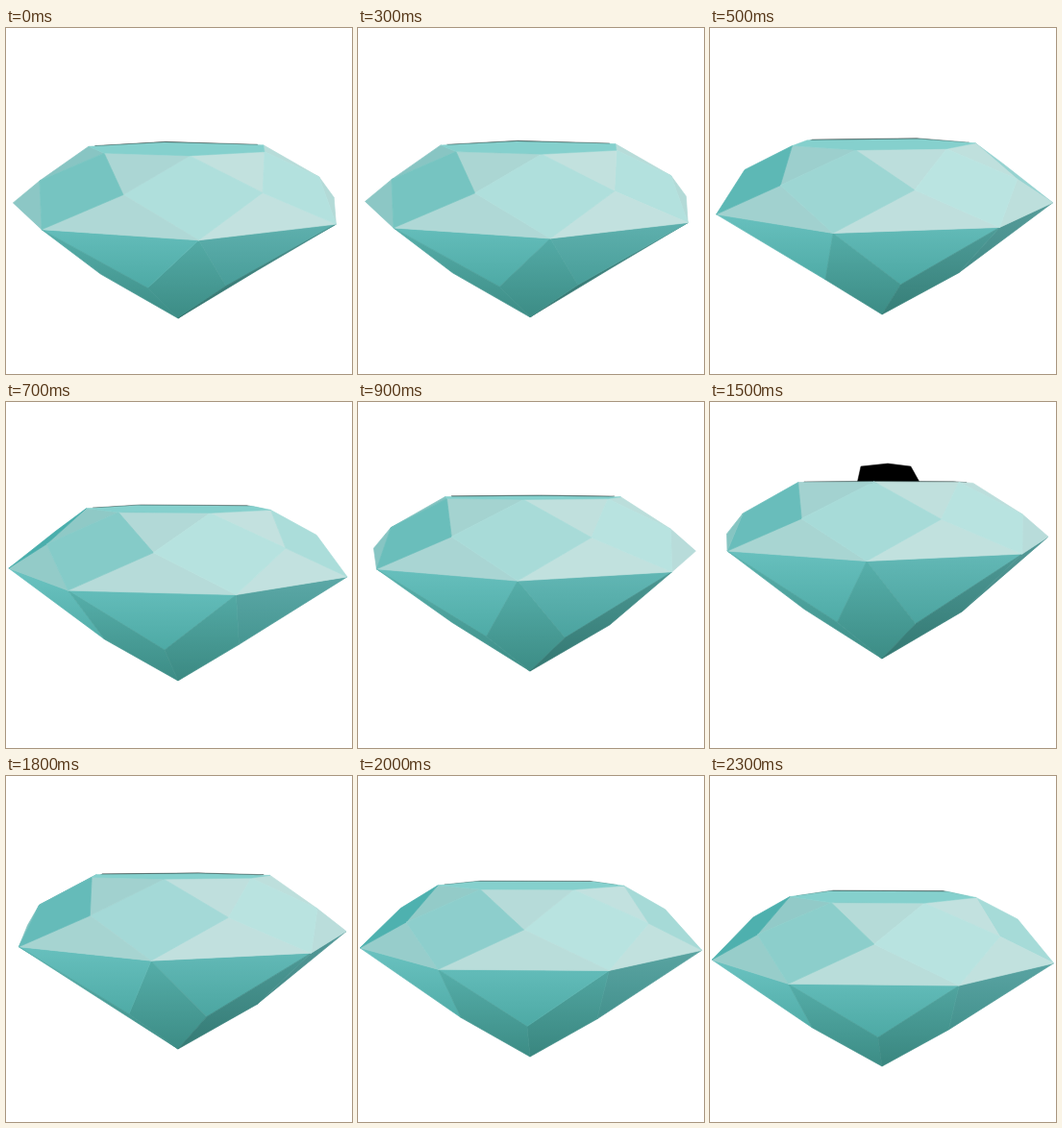
An HTML page with a canvas that plays this animation: 360x360 px, repeating every 2.4 s.

```html
<!DOCTYPE html>
<html>
<head>
<meta charset="utf-8">
<style>
html, body { margin: 0; width: 100%; height: 100%; overflow: hidden; background: #fff; }
canvas { display: block; }
</style>
</head>
<body>
<canvas id="stage" width="360" height="360"></canvas>
<script>
const ctx = document.getElementById('stage').getContext('2d');
const STEP = 100, COUNT = 24, LOOP_TURN = 480;

// Key poses: step, y of the lowest tip, turn in degrees
const keys = [
  [0, 302, 6.6], [5, 298, 103], [9, 280, 175.5], [12, 267, 230.6],
  [15, 267, 294.5], [18, 284, 350.6], [23, 302, 446.4]
];

// Rings of corners; y and depth (the ellipse's y radius) go from high to low view
const rings = {
  table: { r: 97, y: [126, 84], depth: [7, -1] },
  mid: { r: 146, y: [157, 116.5], depth: [18, 6] },
  girdle: { r: 178, y: [193, 147.6], depth: [28, 18] },
  lower: { r: 82, y: [254, 217], depth: [18, 15] }
};

const rad = deg => deg * Math.PI / 180;
const mix = (a, b, t) => a + (b - a) * t;
const blend = (a, b, t) => a.map((v, i) => mix(v, b[i], t));
const rgb = c => `rgb(${c.map(Math.round)})`;

// Crown light comes from the front right; triangles are paler than kites
const lit = deg => blend([58, 167, 165], [186, 228, 225], (1 + Math.cos(rad(deg - 40))) / 2);
const kiteColor = deg => rgb(lit(deg));
const triColor = deg => rgb(blend(lit(deg), [205, 222, 220], .45));

// Smooth curve through one column of the keys; gain is what a loop adds
function curve(col, gain, x) {
  const at = i => {
    const lap = Math.floor(i / keys.length), key = keys[i - lap * keys.length];
    return [key[0] + lap * COUNT, key[col] + lap * gain];
  };
  const slope = i => (at(i + 1)[1] - at(i - 1)[1]) / (at(i + 1)[0] - at(i - 1)[0]);
  let i = 0;
  while (at(i + 1)[0] <= x) i++;
  const [x0, y0] = at(i), [x1, y1] = at(i + 1);
  const w = x1 - x0, t = (x - x0) / w, s = 1 - t;
  return s * s * (1 + 2 * t) * y0 + t * t * (3 - 2 * t) * y1 +
    w * t * s * (s * slope(i) - t * slope(i + 1));
}

function fill(points, color, edge = .7) {
  ctx.beginPath();
  points.forEach(p => ctx.lineTo(...p));
  ctx.closePath();
  ctx.fillStyle = ctx.strokeStyle = color;
  ctx.lineWidth = edge;
  ctx.lineJoin = 'round';
  ctx.fill();
  ctx.stroke();
}

// Fill only when the facet faces the viewer
function facet(points, color) {
  const area = points.reduce((sum, [x, y], i) => {
    const [x2, y2] = points[(i + 1) % points.length];
    return sum + x * y2 - x2 * y;
  }, 0);
  if (area > 0) fill(points, color);
}

function draw(step) {
  const tipY = curve(1, 0, step), turn = curve(2, LOOP_TURN, step);
  const low = (302 - tipY) / 35, tip = [179, tipY];

  const corner = ring => deg => {
    const c = Math.cos(rad(deg)), back = Math.min(0, c);
    return [
      180 + ring.r * Math.sin(rad(deg)) * (1 + .36 * back * back),
      mix(...ring.y, low) + mix(...ring.depth, low) * c
    ];
  };
  const [T, M, G, P] = Object.values(rings).map(corner);

  // Facets below the girdle darken downwards and to the right
  const deep = (top, bottom, deg) => {
    const dim = 1 - .22 * Math.max(0, Math.sin(rad(deg))) ** 2;
    const g = ctx.createLinearGradient(0, mix(...rings.girdle.y, low), 0, tipY);
    [top, bottom].forEach((c, i) => g.addColorStop(i, rgb(c.map(v => v * dim))));
    return g;
  };

  ctx.fillStyle = '#fff';
  ctx.fillRect(0, 0, 360, 360);

  // Dark cap behind the top in the low view, shrinking from the right
  if (low > .9) {
    const right = 230 - 3.7 * (step - 12);
    fill([[153, 85], [157, 67], [185, 64], [right - 10, 67], [right, 85]], '#000', .5);
  }

  const angles = Array.from({ length: 6 }, (_, i) => (turn + 60 * i) % 360);
  const top = angles.map(T);
  fill(top.map(([x, y]) => [mix(180, x, .93), y - .7]), '#243534', .4);

  for (const a of angles) {
    const b = a + 60, m = a + 30;
    facet([G(a), G(b), P(m)], deep([106, 194, 192], [66, 160, 154], m));
    facet([G(a), P(m), tip, P(a - 30)], deep([92, 182, 178], [60, 140, 133], a));
  }
  for (const a of angles) {
    const b = a + 60, m = a + 30;
    facet([T(a), T(b), M(m)], triColor(m - 8));
    facet([G(b), G(a), M(m)], triColor(m));
    facet([T(a), M(m), G(a), M(a - 30)], kiteColor(a));
  }
  if (mix(...rings.table.depth, low) > 0) fill(top, '#85d0cd', .5);
}

function tick(now) {
  draw(Math.floor(now / STEP) % COUNT);
  requestAnimationFrame(tick);
}
draw(0);
requestAnimationFrame(tick);
</script>
</body>
</html>
```
